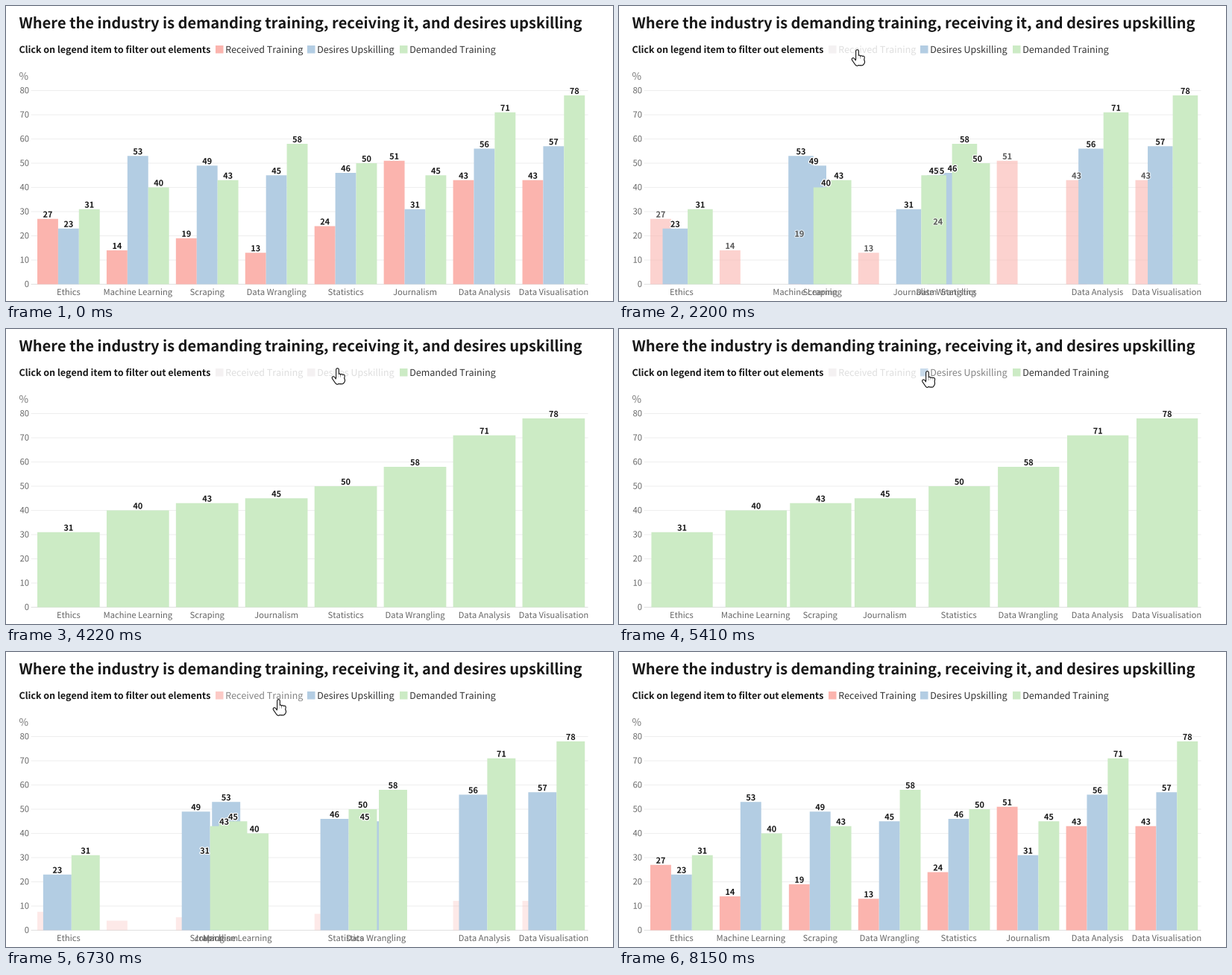
A matplotlib script for the animation above (8.45 s loop, 814 by 396 pixels).

```python
import matplotlib.pyplot as plt
import numpy as np
from matplotlib.animation import FuncAnimation
from matplotlib.collections import LineCollection
from matplotlib.patches import Polygon, Rectangle
from matplotlib.patheffects import Normal, withStroke

W, H, DPI = 814, 396, 64
PT = 72 / DPI  # points per pixel
LOOP, INTERVAL = 8450, 50
STEP, FIRST_STEP = 100.9, 480  # the screen refreshes about ten times a second
plt.rcParams.update({"font.family": "Noto Sans CJK JP", "text.hinting": "none"})

# Category: received, desires, demanded
DATA = {"Ethics": (27, 23, 31), "Machine Learning": (14, 53, 40),
        "Scraping": (19, 49, 43), "Data Wrangling": (13, 45, 58),
        "Statistics": (24, 46, 50), "Journalism": (51, 31, 45),
        "Data Analysis": (43, 56, 71), "Data Visualisation": (43, 57, 78)}
VALUES = np.array(list(DATA.values())).T
COLORS = ["#fbb4ae", "#b3cde3", "#ccebc5"]
LEGEND = {"Received Training": 281, "Desires Upskilling": 404,
          "Demanded Training": 528}
INK = "#181818"
LEFT, PITCH, GROUP = 42, 92.93, 83.7
BASE, UNIT = 373.5, 3.25

# Filter changes: start time and the series active afterwards
DURATION, CLICK_LEAD = 900, 60
FILTERS = [(-DURATION, (0, 1, 2)), (1775, (1, 2)), (3346, (2,)),
           (5240, (1, 2)), (6364, (0, 1, 2))]

# The pointer enters, rests on three legend spots and leaves
ENTER, LEAVE = 480, 8050
SPOTS = [(744, 374), (319, 58), (444, 52), (365, 63), (795, 374)]
MOVES = [(ENTER, 1380), (2600, 3000), (5250, 5700), (6980, 7980)]

ARROW = np.array([(0, 0), (0, 16), (3.7, 12.6), (6.3, 18.4), (8.6, 17.4),
                  (6.1, 11.8), (11, 11.8)])
# Hand: index finger, three curled fingers, thumb and palm as thick strokes
FINGERS = [((3 * k, 9.3 + 0.6 * k), (2 + 1.7 * k, 20)) for k in (1, 2, 2.8)]
HAND = np.array([((0, 2), (0, 20)), *FINGERS,
                 ((-5, 13.5), (-0.5, 20)), ((1.5, 17), (5.5, 17))])
STROKES = np.array([2.6] * 5 + [8])

fig = plt.figure(figsize=(W / DPI, H / DPI), dpi=DPI, facecolor="white")
ax = fig.add_axes([0, 0, 1, 1])
ax.set(xlim=(0, W), ylim=(H, 0))
ax.axis("off")


def write(x, y, text, px, color, **style):
    # Path effects draw text as outlines, so it can sit between pixels
    style.setdefault("path_effects", [Normal()])
    return ax.text(x, y, text, fontsize=px * PT, color=color,
                   va="baseline", **style)


def box(x, y, w, h, color, zorder=1):
    return ax.add_patch(Rectangle((x, y), w, h, fc=color, lw=0,
                                  snap=False, zorder=zorder))


def strokes(color, extra, zorder):
    return ax.add_collection(LineCollection(
        HAND, colors=color, linewidths=(STROKES + extra) * PT,
        capstyle="round", zorder=zorder), autolim=False)


def ease(u):
    u = min(max(u, 0), 1)
    return 4 * u ** 3 if u < 0.5 else 1 - 4 * (1 - u) ** 3


def filter_at(t):
    return max(i for i, (start, _) in enumerate(FILTERS) if start <= t)


def layout(active):
    """Left edge of each category, sorted by the total of the active series."""
    order = np.argsort(VALUES[list(active)].sum(axis=0), kind="stable")
    return LEFT + PITCH * np.argsort(order)


def bar_span(lefts, active, series, category):
    width = GROUP / len(active)
    return np.array([lefts[category] + active.index(series) * width, width])


write(17.5, 30, "Where the industry is demanding training, receiving it, "
      "and desires upskilling", 20, INK, weight="bold")
write(17.5, 63, "Click on legend item to filter out elements", 12.45,
      INK, weight="bold")
write(17.5, 99, "%", 13.6, "#777777")
for tick in range(0, 81, 10):
    y = BASE - UNIT * tick
    ax.plot([34, 780], [y, y], lw=PT, zorder=0, snap=False,
            color="#eeeeee" if tick else "#e0e0e0")
    write(31, y + 3.7, str(tick), 11.2, "#666666", ha="right")

legend = [(box(x, 53, 10.5, 10.5, color), write(x + 13.2, 63, name, 12.5, INK))
          for (name, x), color in zip(LEGEND.items(), COLORS)]
names = [write(0, 388, name, 11.2, "#666666", ha="center") for name in DATA]
bars = [[box(0, 0, 0, 0, color, 1 + s) for _ in DATA]
        for s, color in enumerate(COLORS)]
halo = [withStroke(linewidth=2.4 * PT, foreground="white")]
labels = [[write(0, 0, str(v), 10.9, INK, ha="center", weight="bold",
                 path_effects=halo, zorder=5 + s) for v in row]
          for s, row in enumerate(VALUES)]
arrow = ax.add_patch(Polygon(ARROW, fc="white", ec="#111111", lw=1.2 * PT,
                             joinstyle="round", zorder=10))
hand = [strokes("#111111", 2.2, 10), strokes("white", 0, 11)]


def draw_chart(t):
    current = filter_at(t)
    start, after = FILTERS[current]
    before = FILTERS[max(current - 1, 0)][1]
    p = ease((t - start) / DURATION)
    old, new = layout(before), layout(after)

    for c, name in enumerate(names):
        name.set_x(old[c] + (new[c] - old[c]) * p + GROUP / 2)
    for s, c in np.ndindex(VALUES.shape):
        grow = alpha = label_alpha = 1
        if s in before and s in after:
            a = bar_span(old, before, s, c)
            x, w = a + (bar_span(new, after, s, c) - a) * p
        elif s in before:
            x, w = bar_span(old, before, s, c)
            alpha = label_alpha = 1 - p
        elif s in after:
            x, w = bar_span(new, after, s, c)
            grow = alpha = p
            label_alpha = float(p == 1)
        else:
            x = w = alpha = label_alpha = 0
        height = VALUES[s, c] * UNIT * grow
        bars[s][c].set(bounds=(x, BASE - height, w, height), alpha=alpha,
                       visible=alpha > 0)
        labels[s][c].set(position=(x + w / 2, BASE - height - 2),
                         alpha=label_alpha, visible=label_alpha > 0)


def pointer_tip(t):
    tip = np.array(SPOTS[0], float)
    for (start, end), a, b in zip(MOVES, SPOTS, SPOTS[1:]):
        tip += np.subtract(b, a) * np.clip((t - start) / (end - start), 0, 1)
    return tip


def draw_pointer(t, tip, on_legend):
    shown = ENTER <= t < LEAVE
    arrow.set(xy=ARROW + tip, visible=shown and not on_legend)
    for part in hand:
        part.set_segments(HAND + tip)
        part.set_visible(shown and on_legend)


def draw_legend(t, tip, on_legend):
    active = FILTERS[filter_at(t + CLICK_LEAD)][1]
    for s, ((swatch, text), x) in enumerate(zip(legend, LEGEND.values())):
        on = s in active
        hovered = on and on_legend and x <= tip[0] < x + 123
        swatch.set(facecolor=COLORS[s] if on else "#f4f1f2",
                   alpha=0.7 if hovered else 1)
        text.set(color="#333333" if on else "#dfdfdf",
                 alpha=0.6 if hovered else 1)


def update(frame):
    now = (frame + 0.9) * INTERVAL
    t = FIRST_STEP + STEP * np.floor((now - FIRST_STEP) / STEP)
    tip = pointer_tip(t)
    on_legend = tip[1] < 66
    draw_chart(t)
    draw_pointer(t, tip, on_legend)
    draw_legend(t, tip, on_legend)
    return []


animation = FuncAnimation(fig, update, frames=LOOP // INTERVAL,
                          interval=INTERVAL, init_func=lambda: [],
                          repeat=True, repeat_delay=0, blit=False)
plt.show()
```
